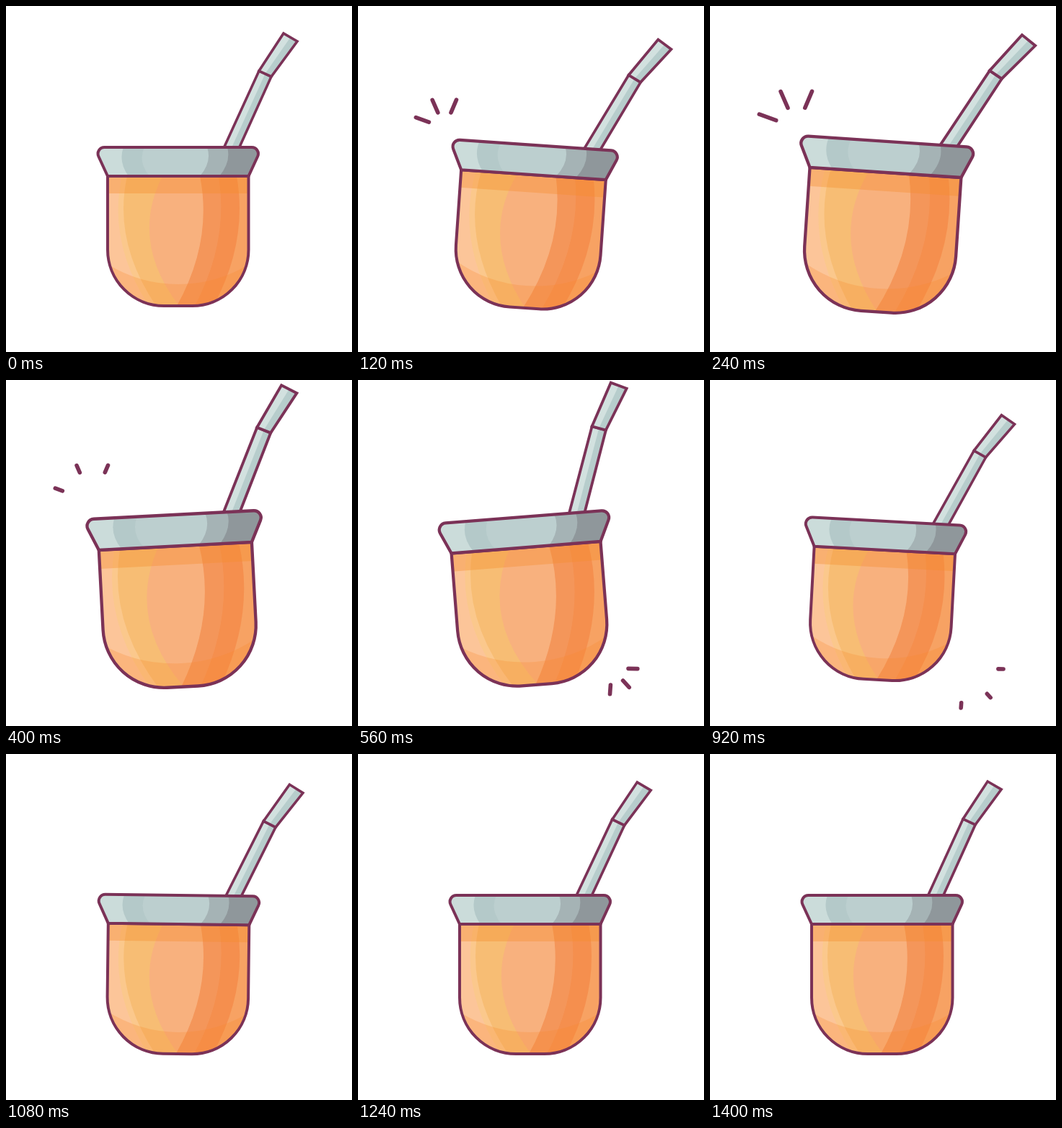
Recreate the animation shown at these times as an HTML page with a canvas. Size 480 by 480 pixels, loop 1440 ms.

```html
<!DOCTYPE html>
<html lang="en">
<head>
<meta charset="utf-8">
<title>Shaking mate cup</title>
<style>
  html, body { margin: 0; width: 100%; height: 100%; overflow: hidden; background: #fff; }
  canvas { display: block; width: 100vw; height: 100vh; }
</style>
</head>
<body>
<canvas id="stage" width="480" height="480"></canvas>
<script>
const ctx = document.getElementById('stage').getContext('2d');
const LOOP = 1440, STEP = 40;
const INK = '#7b3257';
const RIM_TOP = 196, BODY_TOP = 236, BODY_BOTTOM = 416;
const BODY_LEFT = 141, BODY_RIGHT = 336.5;

const clamp = v => Math.min(1, Math.max(0, v));
const radians = degrees => degrees * Math.PI / 180;
const ramp = (t, from, to) => clamp((t - from) / (to - from));
const ease = (t, from, to) => {
  const p = ramp(t, from, to);
  return p * p * (3 - 2 * p);
};

// Swings eased from one extreme to the next; each extreme is [time, degrees]
function swing(t, extremes) {
  let angle = 0, since = 0;
  for (const [time, target] of extremes) {
    angle += (target - angle) * ease(t, since, time);
    since = time;
  }
  return angle;
}

const cupScale = t => 1 + 0.09 * ease(t, 0, 320) * (1 - ease(t, 320, 960));
const cupTilt = t => swing(t, [[170, 5], [505, -5.4], [800, 4], [1180, 0]]);
const strawTilt = t => swing(t, [[240, 5.2], [560, -5.3], [960, 1.8], [LOOP, 0]]);

function turn(x, y, degrees, scale = 1) {
  ctx.translate(x, y);
  ctx.rotate(radians(degrees));
  ctx.scale(scale, scale);
  ctx.translate(-x, -y);
}

function fill(path, color) {
  ctx.fillStyle = color;
  ctx.fill(path);
}

function outline(path, width) {
  ctx.strokeStyle = INK;
  ctx.lineWidth = width;
  ctx.stroke(path);
}

// Clips to the shape, paints its inside, then outlines it
function part(path, color, paint) {
  ctx.save();
  ctx.clip(path);
  fill(path, color);
  paint();
  ctx.restore();
  outline(path, 4);
}

// Paints everything right of a curve given by its x at top, middle and bottom
function band(color, y0, y1, top, middle, bottom) {
  const edge = new Path2D();
  edge.moveTo(top, y0);
  edge.quadraticCurveTo(2 * middle - (top + bottom) / 2, (y0 + y1) / 2, bottom, y1);
  edge.lineTo(400, y1);
  edge.lineTo(400, y0);
  fill(edge, color);
}

function drawBody() {
  const path = new Path2D();
  path.roundRect(BODY_LEFT, BODY_TOP, BODY_RIGHT - BODY_LEFT, BODY_BOTTOM - BODY_TOP, [0, 0, 78, 78]);
  part(path, '#fcc599', () => {
    const stripe = (color, ...xs) => band(color, BODY_TOP, BODY_BOTTOM, ...xs);
    stripe('#fbc88c', 161, 160, 198);
    stripe('#f7bd74', 168, 168, 208);
    stripe('#f8b17e', 217, 200, 240);
    stripe('#f4965a', 269, 270, 237);
    stripe('#f58f4e', 295, 294, 262);
    stripe('#f7a263', 320, 320, 288);
    ctx.fillStyle = 'rgba(244,138,44,.36)';
    ctx.fillRect(BODY_LEFT, BODY_TOP, 200, 24);
    fill(new Path2D('M130 351Q180 386 239 386T348 351V430H130Z'), 'rgba(248,134,44,.26)');
  });
}

function drawRim() {
  const flare = 18.5, left = BODY_LEFT - flare, right = BODY_RIGHT + flare, radius = 9;
  const path = new Path2D();
  path.moveTo(BODY_LEFT, BODY_TOP);
  path.arcTo(left, RIM_TOP, right, RIM_TOP, radius);
  path.arcTo(right, RIM_TOP, BODY_RIGHT, BODY_TOP, radius);
  path.lineTo(BODY_RIGHT, BODY_TOP);
  path.closePath();
  part(path, '#cbdcda', () => {
    const stripe = (color, ...xs) => band(color, RIM_TOP, BODY_TOP, ...xs);
    stripe('#b4c9c9', 163, 161, 170);
    stripe('#bccfcf', 192, 189, 199);
    stripe('#a5b3b5', 279, 280, 269);
    stripe('#8f979b', 307, 307, 296);
  });
}

// A tapering tube through three slanted cross-sections
function drawStraw(angle) {
  const section = (x, y, half, slant) => side =>
    [x + side * half * Math.cos(radians(slant)), y + side * half * Math.sin(radians(slant))];
  const base = section(300, 225, 10.7, 0);
  const bend = section(359.5, 94, 9.4, 25);
  const tip = section(394.5, 43.5, 11, 30);
  const tube = (a, b, side) =>
    new Path2D('M' + [a(-1), b(-1), b(side), a(side)].map(p => p.join(' ')).join('L') + 'Z');

  ctx.save();
  turn(292, BODY_TOP, angle);
  for (const [a, b] of [[base, bend], [bend, tip]]) {
    const whole = tube(a, b, 1);
    fill(whole, '#b7cdcc');
    fill(tube(a, b, 0), '#d2e1df');
    outline(whole, 3.6);
  }
  ctx.restore();
}

// Three rays of a fan that shoot outwards and vanish at their outer ends
function drawBurst(age, x, y, firstAngle) {
  const inner = 23, outer = 55;
  const head = inner + (outer - inner) * ramp(age, 0, 200);
  const tail = inner + (outer - inner) * ramp(age, 160, 520);
  if (head <= tail) return;
  for (let i = 0; i < 3; i++) {
    const a = radians(firstAngle + i * 46.5);
    const ray = new Path2D();
    for (const r of [tail, head]) ray.lineTo(x + r * Math.cos(a), y + r * Math.sin(a));
    outline(ray, 5.6);
  }
}

function render(now) {
  const t = Math.floor((now % LOOP) / STEP) * STEP;
  ctx.fillStyle = '#fff';
  ctx.fillRect(0, 0, 480, 480);
  ctx.lineCap = 'round';
  ctx.save();
  turn(240, 303, cupTilt(t), cupScale(t));
  drawStraw(strawTilt(t));
  drawBody();
  drawRim();
  ctx.restore();
  drawBurst(t, 120, 169, 200);
  drawBurst(t - 480, 352, 400, 1);
}

const begin = performance.now();
function tick() {
  render(performance.now() - begin);
  requestAnimationFrame(tick);
}
tick();
</script>
</body>
</html>
```
